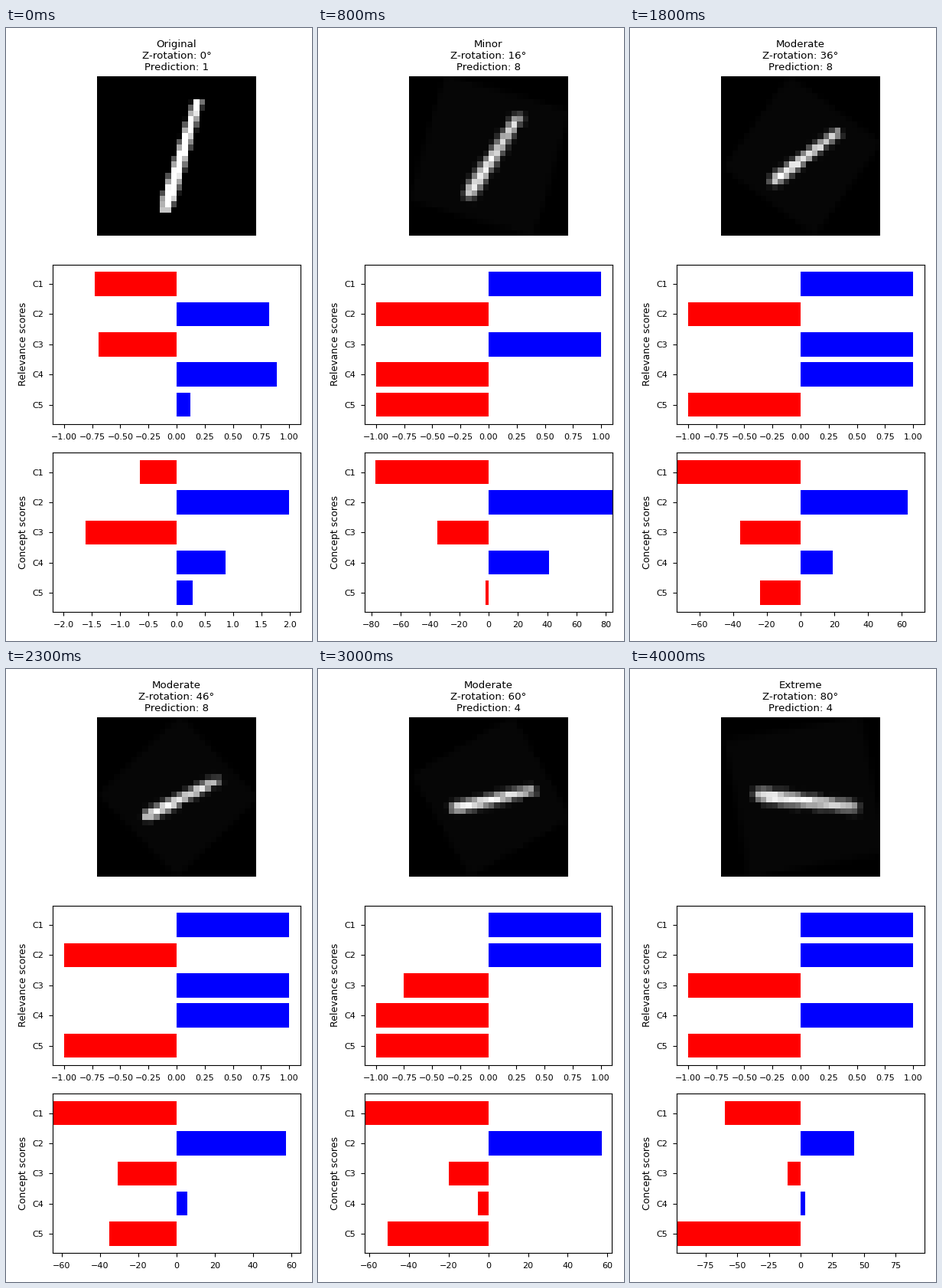
A matplotlib script that plays this animation: 400 by 800 pixels, repeating every 4.1 s.

```python
import numpy as np
import matplotlib.pyplot as plt
from matplotlib.animation import FuncAnimation

W, H, DPI = 400, 800, 100
FRAMES, INTERVAL = 41, 100
STEP_DEG = 2
LEFT, RIGHT = 61.0, 385.0
TOP, PANEL, PITCH = 63.3, 208.0, 245.5
HALF_LABEL = 6.6           # room a two-digit tick label needs past its tick
N = 28                     # raster size
FLOOR = 0.025              # brightness of the digit's own background
FLIP = 27.5                # when the predicted class changes


def make_digit():
    """Slanted stroke on a raster, shaded by pixel coverage."""
    img = np.zeros((N, N))
    cols = np.arange(N)
    for row in range(4, 24):
        centre = 17.2 - 0.3 * (row - 4)
        half = np.interp(row, [4, 21, 23], [1.5, 2.45, 1.55]) / 2
        cover = np.minimum(cols + 0.5, centre + half) - np.maximum(cols - 0.5, centre - half)
        img[row] = np.clip(cover, 0, 1)
    return FLOOR + img


def bilinear(img, x, y):
    """Sample img at (x, y); everything outside it is zero."""
    pad = 2
    img = np.pad(img, pad)
    x = np.clip(x + pad, 0, img.shape[1] - 1.001)
    y = np.clip(y + pad, 0, img.shape[0] - 1.001)
    x0, y0 = x.astype(int), y.astype(int)
    fx, fy = x - x0, y - y0
    upper = img[y0, x0] * (1 - fx) + img[y0, x0 + 1] * fx
    lower = img[y0 + 1, x0] * (1 - fx) + img[y0 + 1, x0 + 1] * fx
    return upper * (1 - fy) + lower * fy


def rotated(img, degrees):
    """Turn clockwise on a grown canvas, shrink back, stretch the contrast."""
    a = np.radians(degrees)
    cos, sin = np.cos(a), np.sin(a)
    size = int(N * (cos + sin))
    gx, gy = np.meshgrid(*[np.arange(size) - size / 2] * 2)
    big = bilinear(img, cos * gx + sin * gy + N / 2, cos * gy - sin * gx + N / 2)

    u = np.clip((np.arange(N) + 0.5) * size / N - 0.5, 0, size - 1)
    out = bilinear(big, *np.meshgrid(u, u))
    return (out - out.min()) / np.ptp(out)


def relevance(i):
    if i == 0:
        return [-0.728, 0.823, -0.694, 0.891, 0.122]
    raw = [1,
           3 * (i - FLIP),
           0.3 * (FLIP - i),
           0.0037 * (i - 11) * (i - FLIP) * (i - 37.2),
           -1]
    return np.clip(raw, -1, 1)


def concept(i):
    if i == 0:
        return [-0.65, 1.99, -1.61, 0.868, 0.285]
    return [np.interp(i, [1, 10, 14, 23, 32, 36, 40],
                      [-62, -82, -80.2, -64.6, -61.3, -68.2, -59.9]),
            np.interp(i, [1, 8, 14, 23, 30, 37], [97, 84.5, 68.8, 57.2, 57.3, 42]),
            np.interp(i, [1, 14, 23, 36], [-29, -40, -31, -10]),
            19 + 25 * np.cos(np.pi * (i - 4) / 28),
            15.5 - 2.2 * i - 0.25 * max(0, i - 30) ** 2]


def severity(degrees):
    if degrees == 0:
        return "Original"
    if degrees <= 30:
        return "Minor"
    return "Moderate" if degrees <= 60 else "Extreme"


def prediction(i):
    if i == 0:
        return 1
    return 8 if i < FLIP else 4


def place(ax, row, left, right):
    bottom = H - (TOP + row * PITCH + PANEL)
    ax.set_position([left / W, bottom / H, (right - left) / W, PANEL / H])


def make_bars(ax, label):
    bars = ax.barh(range(5), [1] * 5)
    ax.set_yticks(range(5), [f"C{k + 1}" for k in range(5)])
    ax.set_ylim(4.64, -0.64)
    ax.set_ylabel(label, fontsize=9)
    ax.tick_params(labelsize=8, pad=5)
    return bars


def set_bars(bars, values):
    for bar, v in zip(bars, values):
        bar.set_width(v)
        bar.set_facecolor("blue" if v > 0 else "red")


def right_edge(ax, lim):
    """Pull the panel in when its last tick label would stick out."""
    k = max(t for t in ax.get_xticks() if t <= lim) / lim
    edge = (2 * (RIGHT - HALF_LABEL) - LEFT * (1 - k)) / (1 + k)
    return min(RIGHT, edge)


fig = plt.figure(figsize=(W / DPI, H / DPI), dpi=DPI, facecolor="white")
ax_img, ax_rel, ax_con = (fig.add_axes([0.2, 0.1 + 0.3 * k, 0.6, 0.2], label=str(k))
                          for k in range(3))
digit = make_digit()
ax_img.axis("off")
picture = ax_img.imshow(digit, cmap="gray", vmin=0, vmax=1,
                        interpolation="nearest", aspect="auto")
rel_bars = make_bars(ax_rel, "Relevance scores")
con_bars = make_bars(ax_con, "Concept scores")
ax_rel.set_xlim(-1.1, 1.1)


def update(i):
    degrees = i * STEP_DEG
    picture.set_data(rotated(digit, degrees))
    ax_img.set_title(f"{severity(degrees)}\nZ-rotation: {degrees}°\n"
                     f"Prediction: {prediction(i)}", fontsize=9.6)

    set_bars(rel_bars, relevance(i))
    values = concept(i)
    set_bars(con_bars, values)
    lim = max(abs(v) for v in values) + 0.2
    ax_con.set_xlim(-lim, lim)

    place(ax_con, 2, LEFT, RIGHT)
    right = right_edge(ax_con, lim)
    middle = (LEFT + right) / 2
    place(ax_img, 0, middle - PANEL / 2, middle + PANEL / 2)
    place(ax_rel, 1, LEFT, right)
    place(ax_con, 2, LEFT, right)
    return []


anim = FuncAnimation(fig, update, frames=FRAMES, interval=INTERVAL,
                     repeat=True, repeat_delay=0, blit=False)
plt.show()
```
